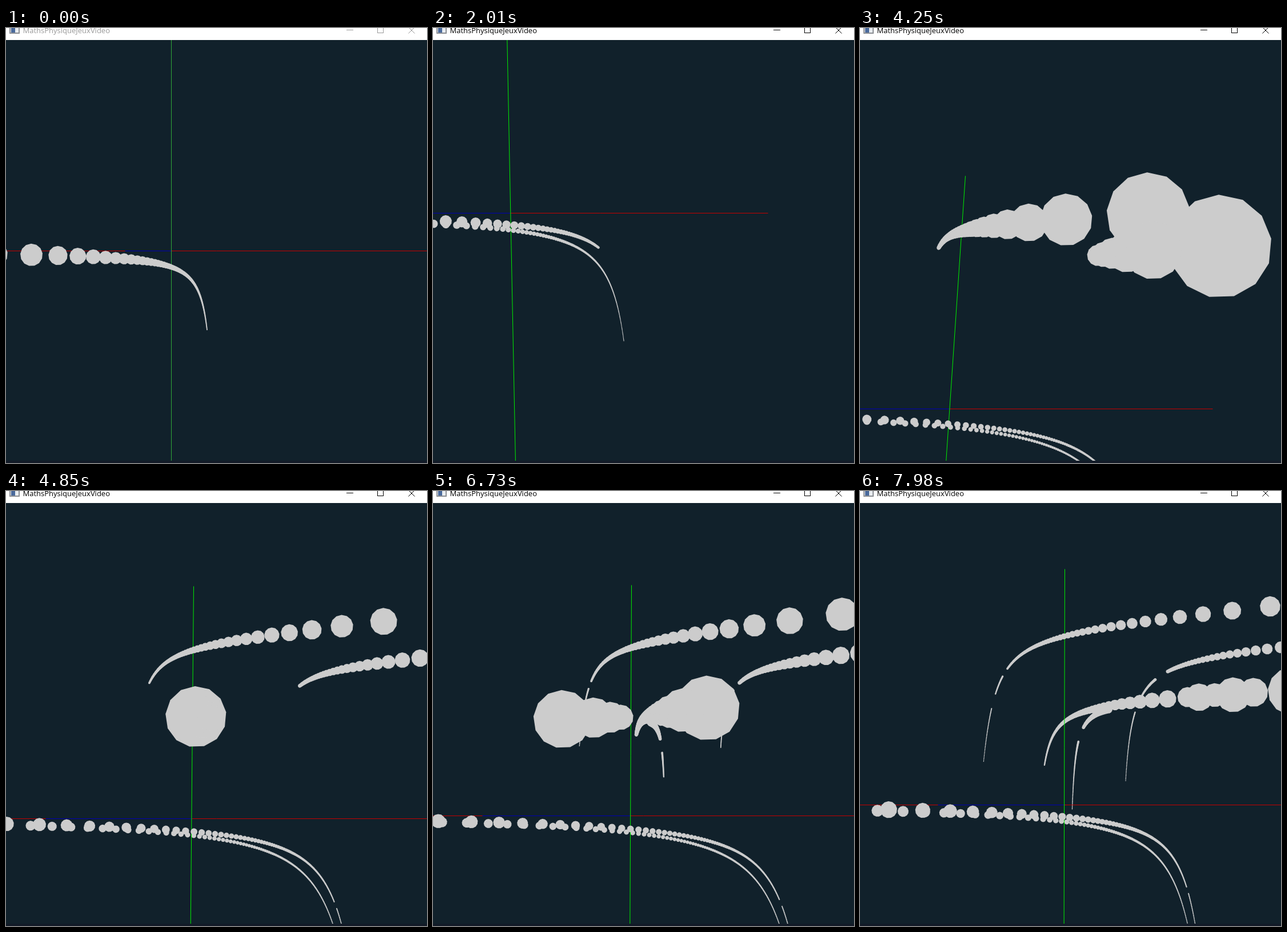
These frames come from a looping animation (737x760 px, 8000 ms). An HTML page with a canvas:

```html
<!DOCTYPE html>
<html>
<head>
<meta charset="utf-8">
<style>
  html, body { margin: 0; width: 100%; height: 100%; overflow: hidden; background: #11212b; }
  canvas { display: block; }
</style>
</head>
<body>
<canvas id="stage" width="737" height="760"></canvas>
<script>
const ctx = document.getElementById('stage').getContext('2d');
const W = 737, H = 760, LOOP = 8000;

// World: axes of half-length AXIS; the camera strafes along x at distance DIST.
const FOCAL = 888, MID_X = 368, MID_Y = 389.5, AXIS = 10, DIST = 19.75;
const RADIUS = .1, SPEED = .038, FALL = .0017, SPACING = .76, RANGE = 150;

// Camera path: time, x, yaw to the left, pitch upwards
const path = [
  [-2400, .1, 0, 0], [0, 1.75, 0, 0], [960, 1.75, 0, 0],
  [2010, 5.02, -.006, -.074], [2850, 5.6, .02, -.07], [3110, 7.9, .23, .039],
  [3270, 8.2, .285, .08], [3550, 8.55, .447, .338], [4110, 8.3, .17, .298],
  [4250, 8, .161, .302], [4735, 6.43, .262, .203], [5580, 7.05, .33, .203],
  [5980, 7.05, .33, .203], [7320, 6.6, .289, .194], [7910, 5.45, .258, .177],
  [LOOP, 5.45, .258, .177]
];

// Shots leave along the view: time and distance of the first bead
const shots = [[-2400, .73], [980, .8], [3550, 1.35], [4110, 1.03], [4735, 1.64], [6000, 1.64]];

// Stalls freeze the picture; beads due during a hitch are lost as well
const hitches = [[3270, 3430], [4850, 5050], [5580, 5980]];
const stalls = [[1520, 2010], [6140, 6290], ...hitches];
const within = (list, t) => list.find(([a, b]) => t >= a && t < b);

function cameraAt(t) {
  const i = Math.max(1, path.findIndex(p => p[0] > t));
  const a = path[i - 1], b = path[i];
  const f = (t - a[0]) / (b[0] - a[0]);
  const [, x, yaw, pitch] = a.map((v, n) => v + (b[n] - v) * f);
  return { x, yaw, pitch };
}

function project(cam, [x, y, z]) {
  const dx = x - cam.x, dz = DIST - z;
  const side = dx * Math.cos(cam.yaw) + dz * Math.sin(cam.yaw);
  const ahead = dz * Math.cos(cam.yaw) - dx * Math.sin(cam.yaw);
  const depth = ahead * Math.cos(cam.pitch) + y * Math.sin(cam.pitch);
  const up = y * Math.cos(cam.pitch) - ahead * Math.sin(cam.pitch);
  return { x: MID_X + FOCAL * side / depth, y: MID_Y - FOCAL * up / depth, depth };
}

// World positions of all beads of one shot, each with the time it appears
function makeTrail([fired, near]) {
  const { x, yaw, pitch } = cameraAt(fired);
  const level = Math.cos(pitch);
  const beads = [];
  for (let d = near; d < RANGE; d += SPACING) {
    const time = fired + d / SPEED;
    if (within(hitches, time)) continue;
    beads.push({
      time,
      at: [
        x - d * level * Math.sin(yaw),
        d * Math.sin(pitch) - FALL * d * d,
        DIST - d * level * Math.cos(yaw)
      ]
    });
  }
  return beads;
}
const beads = shots.flatMap(makeTrail);

function line(color, x0, y0, x1, y1) {
  ctx.strokeStyle = color;
  ctx.lineWidth = 1;
  ctx.beginPath();
  ctx.moveTo(x0, y0);
  ctx.lineTo(x1, y1);
  ctx.stroke();
}

function axis(cam, color, from, to) {
  const a = project(cam, from), b = project(cam, to);
  const snap = v => Math.floor(v) + .5;
  line(color, snap(a.x), snap(a.y), snap(b.x), snap(b.y));
}

function drawBead({ x, y, depth }) {
  const sides = 13, r = Math.max(.65, FOCAL * RADIUS / depth);
  ctx.beginPath();
  for (let i = 0; i < sides; i++) {
    const a = -1.6 + i * 2 * Math.PI / sides;
    ctx.lineTo(x + r * Math.cos(a), y + r * Math.sin(a));
  }
  ctx.fill();
}

function titleBar(active) {
  const ink = active ? '#000' : '#999';
  ctx.fillStyle = '#fff';
  ctx.fillRect(0, 0, W, 21);
  ctx.fillStyle = '#8c8f94';
  ctx.fillRect(6, 0, 18, 10);
  ctx.fillStyle = '#e8ecf0';
  ctx.fillRect(8, 0, 14, 8);
  ctx.fillStyle = '#4a6a9c';
  ctx.fillRect(9, 0, 7, 8);
  ctx.fillStyle = ink;
  ctx.font = '13px "Open Sans", "Noto Sans", sans-serif';
  ctx.fillText('MathsPhysiqueJeuxVideo', 29.5, 9);
  line(ink, 596, 3.5, 608, 3.5);
  ctx.strokeRect(650.5, -2.5, 10, 11);
  line(ink, 704.5, -1.5, 715.5, 9.5);
  line(ink, 715.5, -1.5, 704.5, 9.5);
}

function draw(now) {
  const stall = within(stalls, now);
  const t = stall ? stall[0] : now;
  const cam = cameraAt(t), active = t >= 930;
  const seen = beads.filter(b => b.time <= t)
    .map(b => project(cam, b.at))
    .filter(p => p.depth > .3);

  ctx.fillStyle = '#11212b';
  ctx.fillRect(0, 0, W, H);
  ctx.fillStyle = '#ccc';
  seen.filter(p => p.depth > DIST).forEach(drawBead);
  axis(cam, '#c40000', [-AXIS, 0, 0], [AXIS, 0, 0]);
  axis(cam, '#0000b4', [0, 0, 0], [0, 0, AXIS]);
  axis(cam, active ? '#00f000' : '#2fa83a', [0, -AXIS, 0], [0, AXIS, 0]);
  ctx.fillStyle = '#ccc';
  seen.filter(p => p.depth <= DIST).forEach(drawBead);

  ctx.fillStyle = '#121a27';
  ctx.fillRect(0, 756, W, 4);
  titleBar(active);
}

const began = performance.now();
function tick() {
  draw((performance.now() - began) % LOOP);
  requestAnimationFrame(tick);
}
tick();
</script>
</body>
</html>
```
